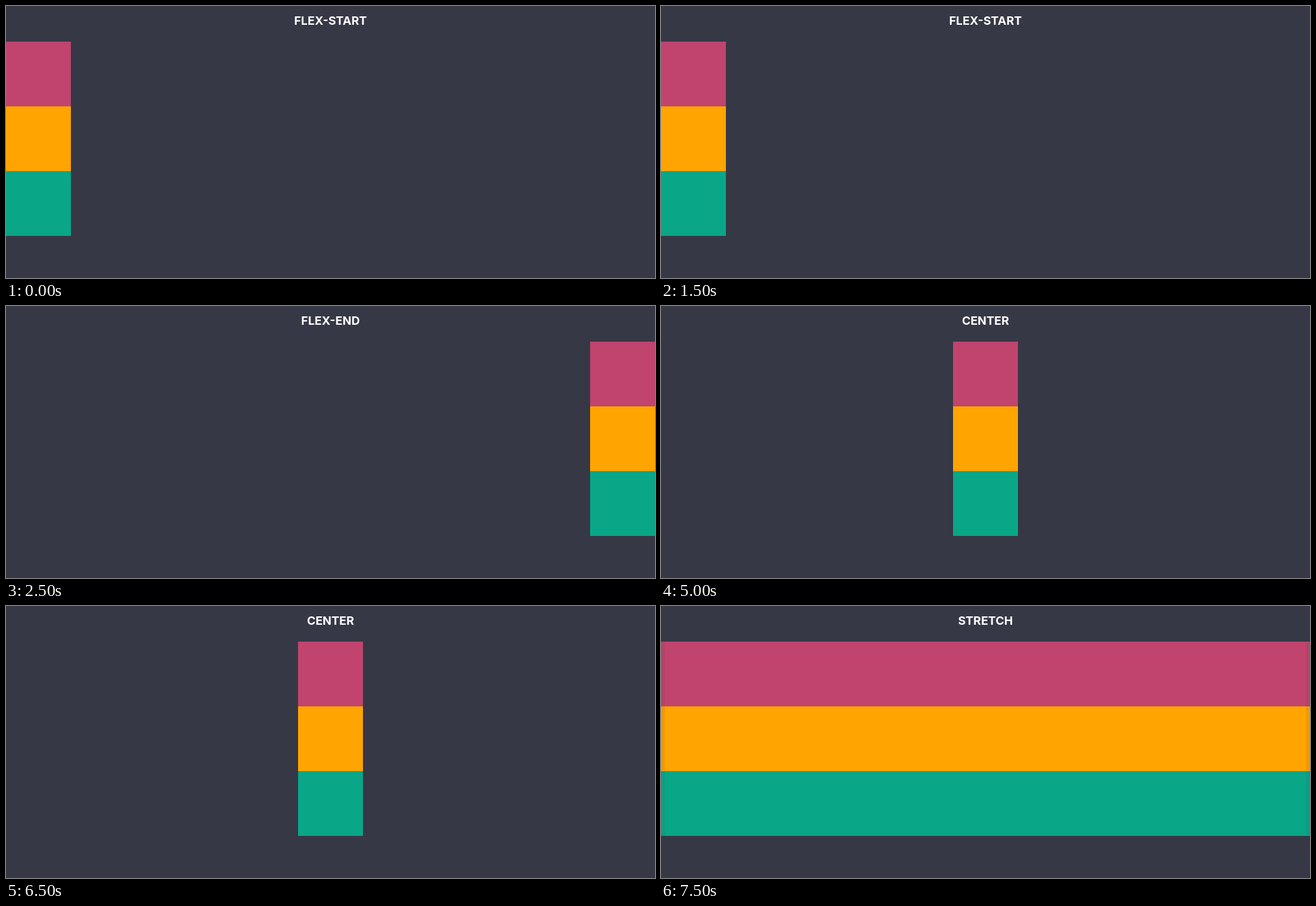
These frames come from a looping animation (1000x420 px, 10000 ms). An HTML page:

```html
<!DOCTYPE html>
<html lang="en">
<head>
<meta charset="utf-8">
<title>align-items</title>
<style>
  html, body { margin: 0; width: 100%; height: 100%; overflow: hidden; background: #363845; }
  h1 {
    margin: 0; height: 55px; text-align: center; color: #fff;
    font: 700 18px/45px Inter, sans-serif; text-transform: uppercase;
  }
  #column { position: relative; display: flex; flex-direction: column; height: 300px; }
  #column div { min-width: 100px; height: 100px; }
  #column.stretch::after {
    content: ""; position: absolute; inset: 0;
    border: solid rgba(54, 56, 69, .09); border-width: 0 6px;
  }
</style>
</head>
<body>
<h1 id="title">flex-start</h1>
<div id="column">
  <div style="background:#c0446e"></div>
  <div style="background:#ffa400"></div>
  <div style="background:#0aa688"></div>
</div>
<script>
  const modes = ["flex-start", "flex-end", "center", "stretch"];
  const hold = 2500;
  const title = document.getElementById("title");
  const column = document.getElementById("column");
  let shown;

  function draw() {
    const mode = modes[Math.floor(performance.now() / hold) % modes.length];
    if (mode !== shown) {
      shown = mode;
      title.textContent = mode;
      column.style.alignItems = mode;
      column.className = mode;
    }
    requestAnimationFrame(draw);
  }
  draw();
</script>
</body>
</html>
```
